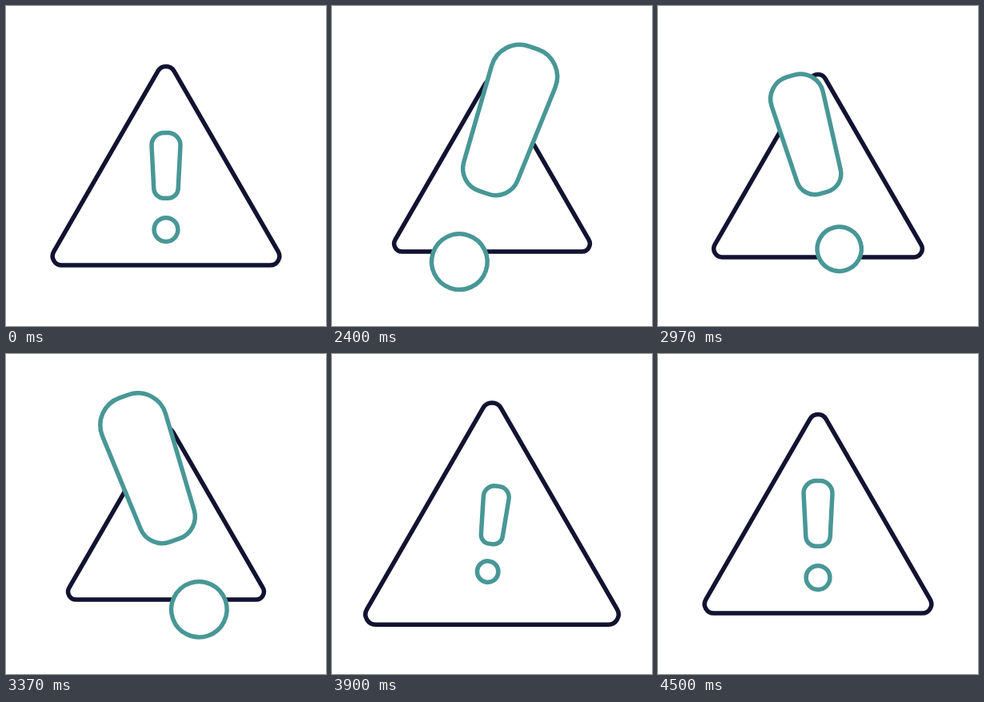
Animation, 400 px wide and 400 px high, one loop 4520 ms. Source, as an HTML page with a canvas:

```html
<!DOCTYPE html>
<html lang="en">
<head>
<meta charset="utf-8">
<title>Warning</title>
<style>
html, body { margin: 0; width: 100%; height: 100%; overflow: hidden; background: #fff; }
canvas { display: block; width: 400px; height: 400px; }
</style>
</head>
<body>
<canvas id="stage"></canvas>
<script>
const LOOP = 4520, REST = 1995, STEP = 25, LENGTH = 2500;
const NAVY = '#121331', TEAL = '#489796', LINE = 5.5;
const CENTER = 200, MARK_Y = 226.3, TILT = 19.6 * Math.PI / 180;

// Swell enlarges the mark and shrinks the triangle; sway tilts the mark.
const KEYS = [
  { at: 0, swell: 0, sway: 0 },
  { at: 370, swell: 1.01, sway: 1 },
  { at: 740, swell: 0.46, sway: -0.7 },
  { at: 1345, swell: 1.01, sway: -1 },
  { at: 1945, swell: -1, sway: 0.35 },
  { at: 2250, swell: 0.13, sway: -0.05 },
  { at: LENGTH, swell: 0, sway: 0 }
];

const canvas = document.getElementById('stage');
const ctx = canvas.getContext('2d');
const ratio = window.devicePixelRatio || 1;
canvas.width = canvas.height = 400 * ratio;

const mix = (a, b, k) => a + (b - a) * k;
const easeInOut = u => (1 - Math.cos(Math.PI * u)) / 2;
const easeFromSpeed = u => 0.4 * u * (1 - u) ** 2 + u * u * (3 - 2 * u);

function poseAt(time) {
  const i = Math.max(1, KEYS.findIndex(key => key.at >= time));
  const from = KEYS[i - 1], to = KEYS[i];
  const u = (time - from.at) / (to.at - from.at);
  const k = i === 1 ? easeFromSpeed(u) : easeInOut(u);
  const swell = mix(from.swell, to.swell, k);
  const up = Math.max(swell, 0), down = Math.max(-swell, 0);
  return {
    frame: 1 - up * (0.107 + 0.03 * up) + 0.119 * down,
    mark: 1 + 1.335 * up - 0.115 * down,
    y: MARK_Y - up * (34 - 9.7 * up) - 1.3 * down,
    angle: TILT * mix(from.sway, to.sway, k)
  };
}

// Corners are { x, y, r }; the path starts halfway along the last edge.
function roundedPath(corners) {
  const path = new Path2D();
  const first = corners[0], last = corners[corners.length - 1];
  path.moveTo((last.x + first.x) / 2, (last.y + first.y) / 2);
  corners.forEach(({ x, y, r }, i) => {
    const next = corners[(i + 1) % corners.length];
    path.arcTo(x, y, next.x, next.y, r);
  });
  path.closePath();
  return path;
}

function trianglePath(radius, centerY, r) {
  return roundedPath([0, 1, 2].map(i => {
    const a = i * Math.PI * 2 / 3;
    return { x: radius * Math.sin(a), y: centerY - radius * Math.cos(a), r };
  }));
}

function barPath(top, bottom) {
  const flip = p => ({ ...p, x: -p.x });
  return roundedPath([flip(top), top, bottom, flip(bottom)]);
}

const triangle = trianglePath(173.4, 37.3, 11.5);
const bar = barPath({ x: 18.8, y: -67.8, r: 15.5 }, { x: 14.6, y: 14, r: 12.5 });
const dot = new Path2D();
dot.arc(0, 53.3, 14.9, 0, Math.PI * 2);

// Scales the outline but keeps the line weight constant.
function drawShape(path, color, y, scale, angle) {
  ctx.save();
  ctx.translate(CENTER, y);
  ctx.rotate(angle);
  ctx.scale(scale, scale);
  ctx.fillStyle = '#fff';
  ctx.strokeStyle = color;
  ctx.lineWidth = LINE / scale;
  ctx.fill(path);
  ctx.stroke(path);
  ctx.restore();
}

function draw(now) {
  const steps = Math.floor((now % LOOP - REST) / STEP);
  const pose = poseAt(Math.min(Math.max(0, steps * STEP), LENGTH));
  ctx.setTransform(ratio, 0, 0, ratio, 0, 0);
  ctx.fillStyle = '#fff';
  ctx.fillRect(0, 0, 400, 400);
  drawShape(triangle, NAVY, CENTER, pose.frame, 0);
  for (const part of [bar, dot]) drawShape(part, TEAL, pose.y, pose.mark, pose.angle);
}

const begin = performance.now();
function tick() {
  draw(performance.now() - begin);
  requestAnimationFrame(tick);
}
tick();
</script>
</body>
</html>
```
